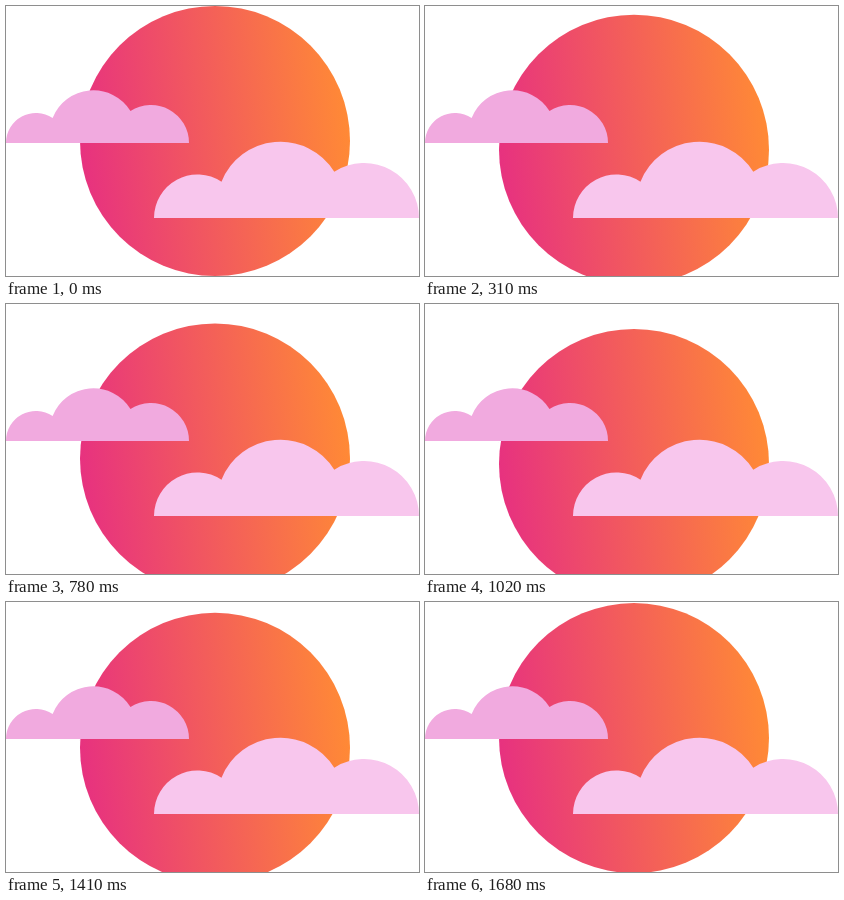
An HTML page that plays this animation: 413 px wide and 270 px high, repeating every 1.71 s.

```html
<!DOCTYPE html>
<html lang="en">
<head>
<meta charset="utf-8">
<title>Sun behind clouds</title>
<style>
  html, body { margin: 0; width: 100%; height: 100%; overflow: hidden; background: #fff; }
  svg { display: block; width: 100%; height: 100%; }
</style>
</head>
<body>
<svg viewBox="0 0 413 270" xmlns="http://www.w3.org/2000/svg">
  <defs>
    <linearGradient id="glow" gradientUnits="userSpaceOnUse" x1="76" y1="148" x2="342" y2="122">
      <stop offset="0" stop-color="#e7327f"/>
      <stop offset="1" stop-color="#ff8936"/>
    </linearGradient>
    <path id="cloud" d="M0 0A30 30 0 0 1 46.6 -25A43.8 43.8 0 0 1 124.5 -32A38 38 0 0 1 183 0Z"/>
  </defs>
  <circle id="sun" cx="209" cy="135" r="135" fill="url(#glow)"/>
  <use href="#cloud" transform="translate(0 137)" fill="#f1aadf"/>
  <use href="#cloud" transform="translate(148 212) scale(1.448)" fill="#f8c6ed"/>
</svg>
<script>
  const LOOP = 1710, TICK = 30, STEPS = 24, DROP = 26;
  const sun = document.getElementById('sun');

  // Steps taken so far: a rest at the top, then a pause on the way down.
  function stepAt(t) {
    if (t < 100) return 0;
    if (t < 720) return Math.min(15, 1 + Math.floor((t - 100) / TICK));
    return 16 + Math.floor((t - 720) / TICK);
  }

  function draw(t) {
    const n = stepAt(t);
    const level = Math.min(n, 2 * STEPS + 1 - n);
    sun.setAttribute('transform', `translate(0 ${level * DROP / STEPS})`);
  }

  let start;
  function frame(now) {
    start ??= now;
    draw((now - start) % LOOP);
    requestAnimationFrame(frame);
  }
  draw(0);
  requestAnimationFrame(frame);
</script>
</body>
</html>
```
